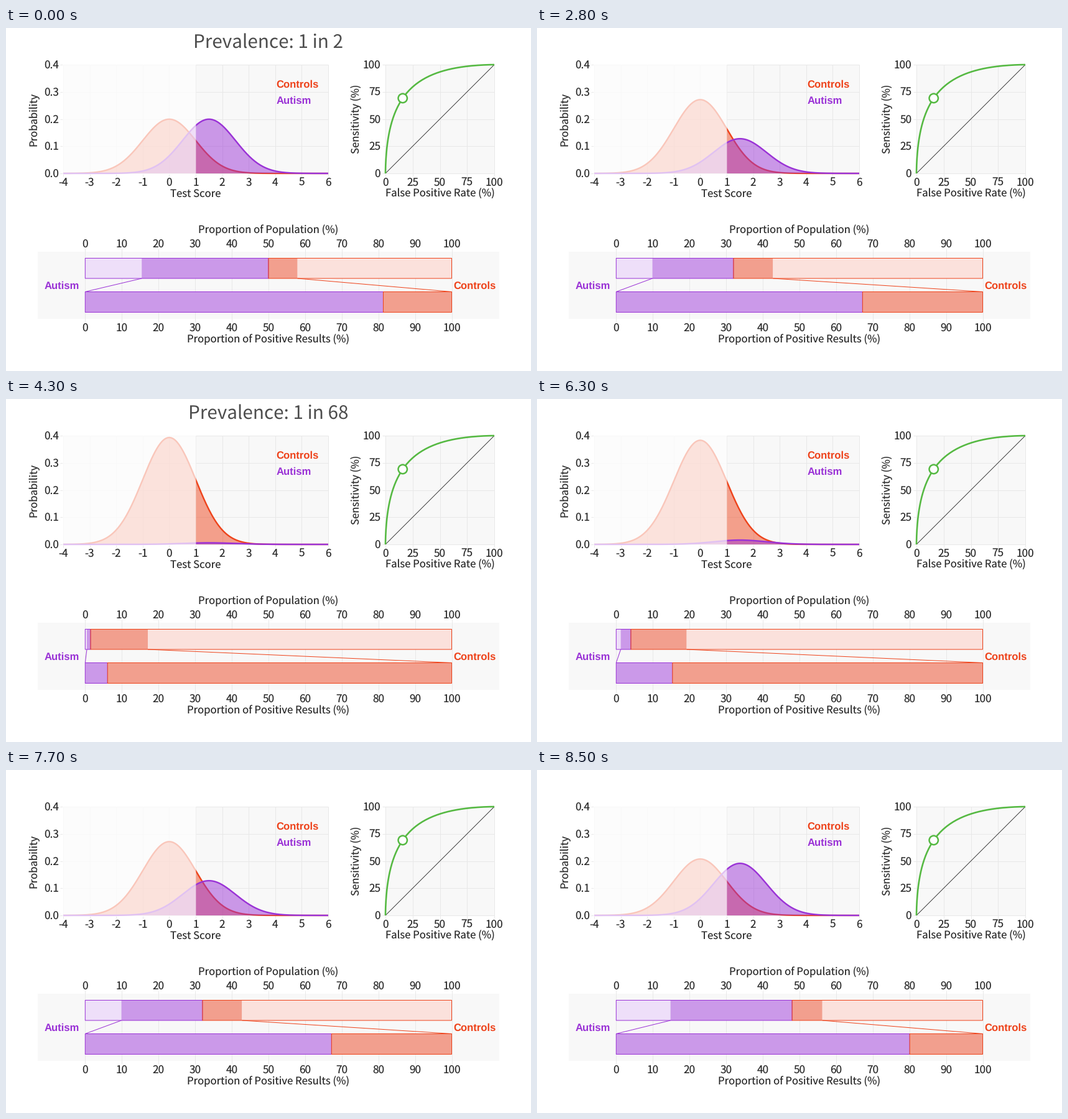
Animation of 844x552 px, one loop 8.6 s. Source, as a matplotlib script:

```python
import math

import numpy as np
import matplotlib.pyplot as plt
from matplotlib.animation import FuncAnimation
from matplotlib.patches import Circle, Polygon, Rectangle

W, H, DPI = 844, 552, 64
PX = 72 / DPI                      # points per pixel
ORANGE, PURPLE, GREEN = "#ee431b", "#9a32d6", "#55b942"
ORANGE_MID, ORANGE_PALE = "#f29f8e", "#fbe1dc"
PURPLE_MID, PURPLE_PALE = "#cb99e9", "#eedff9"
PANEL, GRID, INK = "#f8f8f8", "#e8e8e8", "#2b2b2b"
MEAN, CUT = 1.5, 1.0
RARE = 1 / 68

plt.rcParams["font.family"] = "Noto Sans CJK JP"
plt.rcParams["text.hinting"] = "none"
plt.rcParams["lines.solid_capstyle"] = "butt"

fig = plt.figure(figsize=(W / DPI, H / DPI), dpi=DPI, facecolor="white")
ax = fig.add_axes([0, 0, 1, 1])
ax.set_xlim(0, W)
ax.set_ylim(H, 0)
ax.axis("off")


def upper_tail(z):
    return 0.5 * math.erfc(z / math.sqrt(2))


def density(x, mean):
    return np.exp(-(x - mean) ** 2 / 2) / math.sqrt(2 * math.pi)


def score_x(v):
    return 92 + 42.6 * (v + 4)


def prob_y(v):
    return 234 - 437.5 * v


def roc_x(v):
    return 610 + 1.75 * v


def roc_y(v):
    return 234 - 1.75 * v


def bar_x(v):
    return 127.3 + 5.892 * v


def text(x, y, s, size=16.7, color=INK, ha="center", **kw):
    return ax.text(x, y, s, fontsize=size * PX, color=color, ha=ha,
                   va="baseline", **kw)


def label(x, y, s, color, ha="left"):
    text(x, y, s, 16.6, color, ha, family="Liberation Sans", weight="bold")


def line(xs, ys, color, width=1.0, z=2):
    return ax.plot(xs, ys, color=color, lw=width * PX, zorder=z)[0]


def rect(x0, y0, x1, y1, color, z=1, edge="none", alpha=None):
    r = Rectangle((x0, y0), x1 - x0, y1 - y0, facecolor=color, edgecolor=edge,
                  lw=PX if edge != "none" else 0, alpha=alpha, zorder=z,
                  snap=False)
    return ax.add_patch(r)


def span(r, a, b):
    r.set_x(bar_x(a))
    r.set_width(bar_x(b) - bar_x(a))


def side_text(x, y, s):
    text(x, y, s, rotation=90, rotation_mode="anchor")


# Score distributions
rect(92, 59, 518, 234, PANEL)
for v in range(-4, 7):
    line([score_x(v)] * 2, [59, 239], GRID)
    text(score_x(v), 254, str(v), 17.2)
for i in range(5):
    y = prob_y(i / 10)
    line([87, 518], [y, y], GRID)
    text(85.2, y + 6, f"{i / 10:.1f}", 17.2, ha="right")
text(305, 272, "Test Score")
side_text(50, 146.5, "Probability")
label(434.3, 95.8, "Controls", ORANGE)
label(434.3, 121.8, "Autism", PURPLE)

scores = np.linspace(-4, 6, 301)
curve_x = score_x(scores)


def make_curve(color, z):
    fill = Polygon([(0, 0), (1, 0), (1, 1)], closed=True, facecolor=color,
                   edgecolor="none", alpha=0.49, zorder=z)
    ax.add_patch(fill)
    return fill, line(curve_x, curve_x * 0, color, 2.4, z + 0.5)


def set_curve(curve, weight, mean):
    fill, stroke = curve
    y = prob_y(weight * density(scores, mean))
    stroke.set_ydata(y)
    base = prob_y(0)
    fill.set_xy([(curve_x[0], base), *zip(curve_x, y), (curve_x[-1], base)])


controls = make_curve(ORANGE, 3)
cases = make_curve(PURPLE, 4)
rect(91, 58, score_x(CUT) + 0.4, 236, "white", 5, alpha=0.7)

# ROC curve
rect(610, 59, 785, 234, PANEL)
for v in range(0, 101, 25):
    line([roc_x(v)] * 2, [59, 239], GRID)
    line([605, 785], [roc_y(v)] * 2, GRID)
    text(roc_x(v), 254, str(v), 17.2)
    text(602.3, roc_y(v) + 6, str(v), 17.2, ha="right")
text(697.7, 272, "False Positive Rate (%)")
side_text(568.5, 146.5, "Sensitivity (%)")
line([610, 785], [roc_y(0), roc_y(100)], "#222222", 0.85)
cuts = np.linspace(-4.5, 6, 240)
line([roc_x(100 * upper_tail(c)) for c in cuts],
     [roc_y(100 * upper_tail(c - MEAN)) for c in cuts], GREEN, 2.6, 3)
FPR, TPR = upper_tail(CUT), upper_tail(CUT - MEAN)
ax.add_patch(Circle((roc_x(100 * FPR), roc_y(100 * TPR)), 7.2, facecolor="white",
                    edgecolor=GREEN, lw=2.5 * PX, zorder=4))

# Stacked bars
rect(51, 360, 793, 468, PANEL)
for v in range(0, 101, 10):
    line([bar_x(v)] * 2, [355, 473], GRID)
    text(bar_x(v), 352.4, str(v), 17.2)
    text(bar_x(v), 487.8, str(v), 17.2)
text(422, 329.8, "Proportion of Population (%)")
text(422, 505.8, "Proportion of Positive Results (%)")
label(118.2, 419.5, "Autism", PURPLE, "right")
label(719.5, 419.5, "Controls", ORANGE)

TOP, LOW = (370.5, 403), (424.5, 457.5)


def bar(rows, color, z=3, edge="none"):
    return rect(bar_x(0), rows[0], bar_x(1), rows[1], color, z, edge)


missed = bar(TOP, PURPLE_PALE)
found = bar(TOP, PURPLE_MID)
false_pos = bar(TOP, ORANGE_MID)
cleared = bar(TOP, ORANGE_PALE)
case_box = bar(TOP, "none", 4, PURPLE)
control_box = bar(TOP, "none", 5, ORANGE)
true_share = bar(LOW, PURPLE_MID, 4, PURPLE)
false_share = bar(LOW, ORANGE_MID, 5, ORANGE)
left_link = line([0, 0], [TOP[1], LOW[0]], PURPLE, 1, 6)
right_link = line([0, 0], [TOP[1], LOW[0]], ORANGE, 1, 6)

title = text(421.8, 32.6, "", 29.7, "#4d4d4d")


def prevalence(n):
    if n < 20:
        return 0.5
    if n < 43:
        return (48 - 2 * (n - 20)) / 100
    if n < 63:
        return RARE
    return (4 + 2 * (n - 63)) / 100


def update(n):
    p = prevalence(n)
    held = n < 20 or 43 <= n < 63
    title.set_text(f"Prevalence: 1 in {round(1 / p)}" if held else "")
    set_curve(controls, 1 - p, 0)
    set_curve(cases, p, MEAN)

    split = 100 * p
    start = split * (1 - TPR)
    end = split + (100 - split) * FPR
    share = 100 * (split - start) / (end - start)
    span(missed, 0, start)
    span(found, start, split)
    span(false_pos, split, end)
    span(cleared, end, 100)
    span(case_box, 0, split)
    span(control_box, split, 100)
    span(true_share, 0, share)
    span(false_share, share, 100)
    left_link.set_xdata([bar_x(start), bar_x(0)])
    right_link.set_xdata([bar_x(end), bar_x(100)])
    return []


anim = FuncAnimation(fig, update, frames=86, interval=100, repeat=True,
                     init_func=lambda: update(0), blit=False)
plt.show()
```
